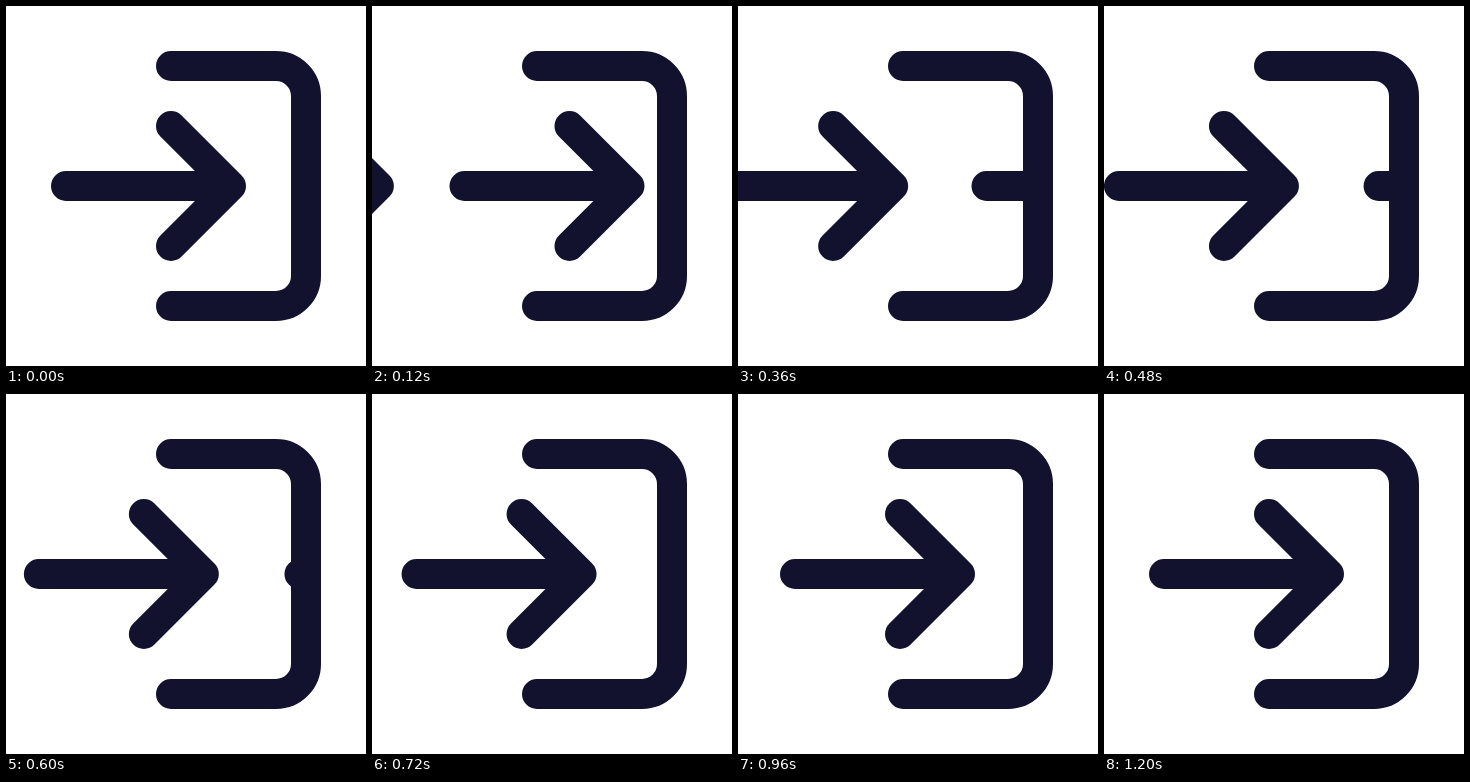
Animation, 360 px wide and 360 px high, one loop 2230 ms. Source, as an HTML page:

```html
<!DOCTYPE html>
<html lang="en">
<head>
<meta charset="utf-8">
<title>Enter arrow</title>
<style>
  html, body { margin: 0; width: 100%; height: 100%; overflow: hidden; background: #fff; }
  svg { display: block; width: 100%; height: 100%; }
  .line { fill: none; stroke: #12122f; stroke-width: 30; stroke-linecap: round; stroke-linejoin: round; }
</style>
</head>
<body>
<svg viewBox="0 0 360 360">
  <defs>
    <clipPath id="door"><rect width="300" height="360"/></clipPath>
    <path id="arrow" d="M60 180H225M165 120L225 180L165 240"/>
  </defs>
  <g class="line" clip-path="url(#door)">
    <use id="leaving" href="#arrow"/>
    <use id="arriving" href="#arrow"/>
  </g>
  <path class="line" d="M165 60H270A30 30 0 0 1 300 90V270A30 30 0 0 1 270 300H165"/>
</svg>
<script>
  const LOOP = 2230, MOVE = 1200, STEP = 30;
  const EXIT = 262, ENTRY = 249;

  // time fraction, progress, speed
  const knots = [
    [0, 0, 0],
    [0.1, 0.124, 3.36],
    [0.2, 0.518, 2.9],
    [0.4, 0.819, 0.86],
    [0.6, 0.938, 0.36],
    [0.8, 0.988, 0.12],
    [1, 1, 0]
  ];

  const leaving = document.getElementById('leaving');
  const arriving = document.getElementById('arriving');

  // Cubic Hermite curve through the knots
  function progress(t) {
    if (t >= 1) return 1;
    const i = knots.findIndex(k => k[0] > t);
    const [t0, p0, v0] = knots[i - 1];
    const [t1, p1, v1] = knots[i];
    const span = t1 - t0, u = (t - t0) / span, w = 1 - u;
    return p0 * w * w * (1 + 2 * u) + p1 * u * u * (3 - 2 * u)
      + span * u * w * (v0 * w - v1 * u);
  }

  function shift(el, x) {
    el.setAttribute('transform', `translate(${x.toFixed(2)} 0)`);
  }

  function draw(ms) {
    const held = Math.floor(ms / STEP) * STEP;
    const p = progress(held / MOVE);
    shift(leaving, EXIT * p);
    shift(arriving, ENTRY * (p - 1));
  }

  const start = performance.now();
  function tick() {
    draw((performance.now() - start) % LOOP);
    requestAnimationFrame(tick);
  }
  tick();
</script>
</body>
</html>
```
